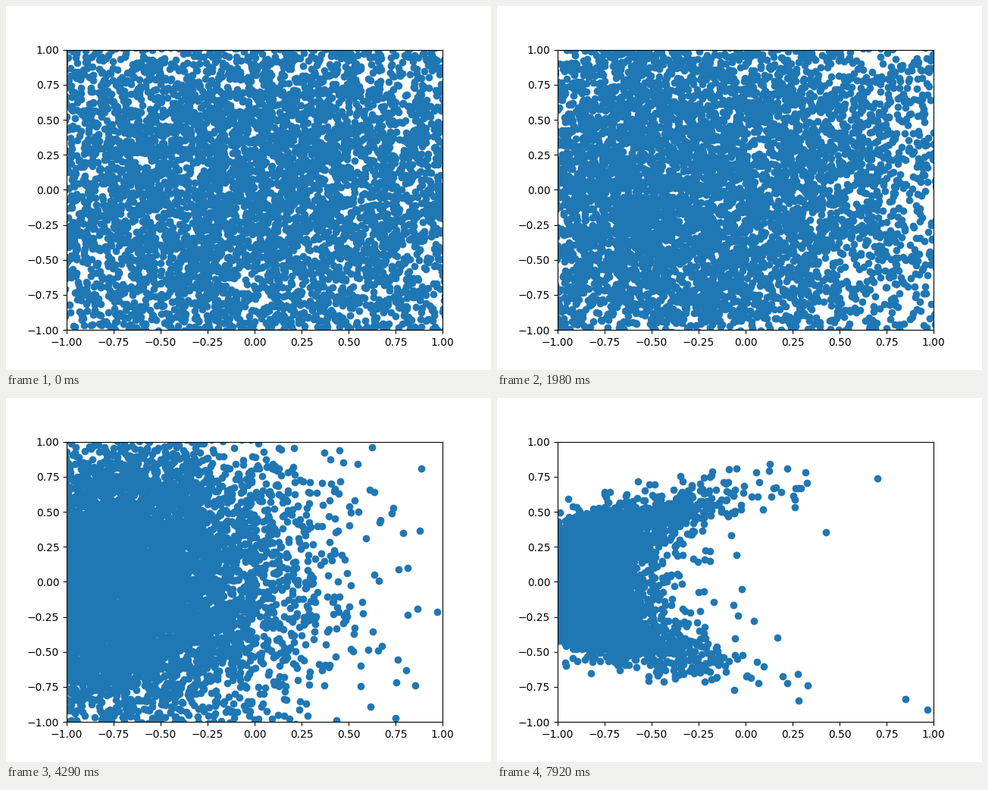
These frames come from a looping animation (640 by 480 pixels, 8000 ms). A matplotlib script:

```python
import numpy as np
import matplotlib.pyplot as plt
from matplotlib.animation import FuncAnimation

COUNT = 10000
LOOP_MS = 8000
TICK_MS = 40
STEP_MS = 330  # each sample stays on screen this long
NOISE = 0.95

# Mixing angle between crescent (0) and pure noise (pi/2) over the steps
KEY_STEPS = [0, 2, 6, 10, 16, 20, 24]
KEY_ANGLES = [1.53, 1.46, 1.08, 0.668, 0.305, 0.11, 0.02]


def crescent(rng):
    y = rng.normal(0, 0.243, COUNT)
    spread = 0.17 * (1 + 2.5 * np.minimum(y**4, 1))
    x = -1.03 + 1.95 * y**2 - 0.3 * y**4 + spread * rng.standard_t(8, COUNT)
    return np.column_stack([x, y])


def sample(step):
    rng = np.random.default_rng(100 + step)
    angle = np.interp(step, KEY_STEPS, KEY_ANGLES)
    noise = rng.normal(0, NOISE, (COUNT, 2))
    pts = np.cos(angle) * crescent(rng) + np.sin(angle) * noise
    return pts[np.all(np.abs(pts) < 1.1, axis=1)]


clouds = [sample(k) for k in range((LOOP_MS - 1) // STEP_MS + 1)]

fig, ax = plt.subplots(figsize=(6.4, 4.8), dpi=100)
dots = ax.scatter(clouds[0][:, 0], clouds[0][:, 1])
ax.set_xlim(-1, 1)
ax.set_ylim(-1, 1)


def update(i):
    step = (i * TICK_MS + TICK_MS - 1) // STEP_MS
    dots.set_offsets(clouds[step])
    return (dots,)


anim = FuncAnimation(fig, update, frames=LOOP_MS // TICK_MS, init_func=lambda: update(0),
                     interval=TICK_MS, repeat=True, repeat_delay=0)
plt.show()
```
